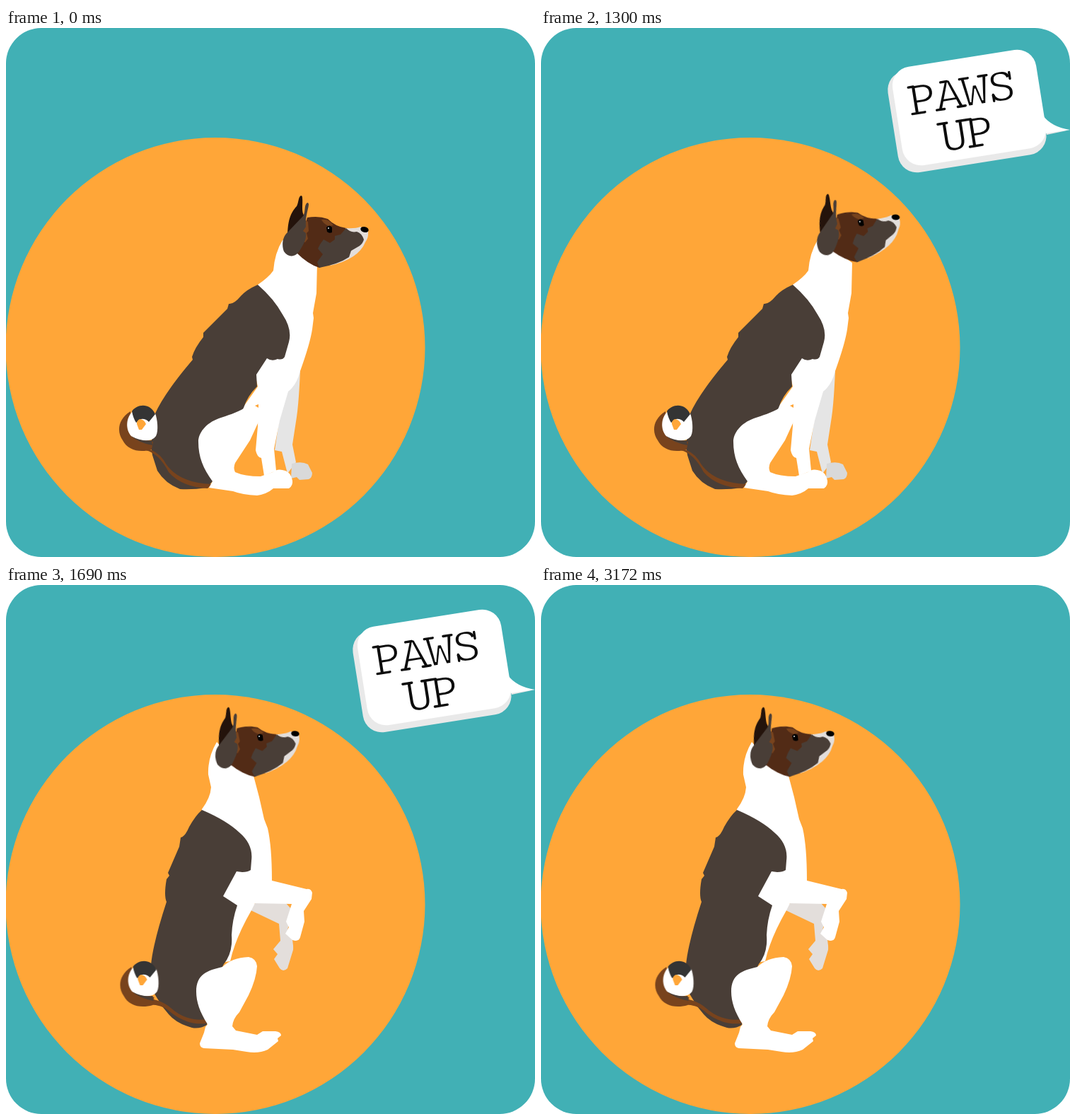
Animation of 748 by 748 pixels, one loop 3.64 s. Source, as an HTML page:

```html
<!DOCTYPE html>
<html lang="en">
<head>
<meta charset="utf-8">
<title>Paws up</title>
<style>
  html, body { margin: 0; width: 100%; height: 100%; overflow: hidden; background: #fff; }
  svg { display: block; width: 100%; height: 100%; }

  .dark { fill: #493e37; }
  .white { fill: #fff; }
  .far { fill: #e3dedb; }
  .tan { fill: #78431d; }
  .brown { fill: #522b16; }
  .orange { fill: #ffa638; }

  .pose, .head, .tail, .bubble { animation: 3640ms step-end infinite; }
  .sit { animation-name: sit; }
  .lift { animation-name: lift; }
  .rise { animation-name: rise; }
  .up { animation-name: up; }
  .head { animation-name: head; transform-origin: 402px 323px; }
  .tail { animation-name: tail; }
  .bubble { animation-name: bubble; }

  @keyframes sit { 0% { visibility: visible } 39.2857%, 100% { visibility: hidden } }
  @keyframes lift { 0%, 42.8571%, 100% { visibility: hidden } 39.2857% { visibility: visible } }
  @keyframes rise { 0%, 46.4286%, 100% { visibility: hidden } 42.8571% { visibility: visible } }
  @keyframes up { 0% { visibility: hidden } 46.4286%, 100% { visibility: visible } }
  @keyframes head {
    0% { transform: none }
    17.8571% { transform: translate(2px, -1px) rotate(-9.3deg) }
    39.2857% { transform: translate(-21px, -8px) rotate(-4.4deg) }
    42.8571% { transform: translate(-39px, -49.5px) rotate(-4.1deg) }
    46.4286%, 100% { transform: translate(-93px, -63px) rotate(-6.6deg) }
  }
  @keyframes tail {
    0% { transform: none }
    39.2857% { transform: translate(-3.5px, 5.5px) }
    42.8571% { transform: translate(4.5px, -4px) }
    46.4286%, 100% { transform: translate(1.5px, -2px) }
  }
  @keyframes bubble {
    0%, 67.8571%, 100% { visibility: hidden }
    17.8571% { visibility: visible; transform: none }
    42.8571% { visibility: visible; transform: translateY(4px) }
  }

  text {
    font: 62.4px "Liberation Mono", "Courier New", monospace;
    text-anchor: middle; fill: #0c0c0c; stroke: #fff; stroke-width: 1.7px;
  }
  .serifs { fill: none; stroke: #0c0c0c; stroke-width: 3.4; stroke-linecap: round; }
</style>
</head>
<body>
<svg viewBox="0 0 748 748">
  <rect width="748" height="748" rx="50" fill="#41b0b5"/>
  <circle class="orange" cx="296" cy="451.5" r="296.5"/>

  <g class="pose sit">
    <path fill="#e5e5e5" d="M416 485Q414 530 411 550L405 589 410 614 398 630 390 599 380 597 392 515Z"/>
    <path fill="#d9d9d9" d="M404 616Q418 612 427 617L433 629Q433 636 428 638L415 639 411 635 403 637Z"/>
    <path class="white" d="M391 300Q380 318 378 343 372 352 356 363L340 440 350 480 356 507 334 538 345 545 357 533 356 563 353 597Q355 607 361 608L365 633 382 626 379 595 387 555 399 514Q411 505 416 485 430 446 433 426L435 410 434 403 439 375 440 332 410 310Z"/>
    <path class="dark" d="M356 363Q379 383 391 405 405 426 400 444L394 465Q391 470 384 468 376 472 369 467L354 490 355 507Q342 519 336 537L300 600 292 641 284 650Q264 653 246 652 225 644 214 626L207 604 205 590 211 545Q224 516 264 469L263 465Q267 452 279 437L279 431 313 397 315 390Q322 391 332 379 340 370 356 363Z"/>
    <path class="tan" d="M197 594Q214 598 223 611 240 643 291 645L285 651Q248 649 230 628 216 601 197 597Z"/>
    <path class="white" d="M338 537C326 544 313 548 301 552 282 559 272 573 272 585 272 607 279 623 292 641L287 650 321 655Q334 660 355 661 369 659 378 651L400 651Q406 647 405 640 403 629 395 626 384 622 377 628L360 634Q337 634 324 628 321 622 324 615L345 583 357 557 357 532Z"/>
    <path class="orange" d="M352 534l5-2v5z"/>
  </g>

  <g class="pose lift">
    <path class="far" d="M407 470L404 545 402 575 409 602Q422 602 428 607L434 619 431 626 413 626 410 621 395 617 387 591Q377 587 377 578L375 535 371 505Z"/>
    <path class="white" d="M370 288Q356 309 357 334 350 346 336 356L320 440 346 495 325 540 334 540Q349 522 372 506L416 549 420 557 419 575 414 584 420 589 415 598Q419 605 424 609 432 615 436 609L442 587 439 571 446 548 404 486Q414 452 417 425L420 403 418 390 420 362 419 322 390 302Z"/>
    <path class="dark" d="M336 357Q361 377 377 399 388 414 387 433 386 448 382 457L373 459Q368 459 364 464L346 470 351 492 354 494Q334 515 328 541L300 600 292 641 284 650Q264 654 246 653 225 645 214 626L203 600 205 545Q217 512 253 471L252 466Q255 452 266 437L265 431 295 396 297 388Q303 388 311 377 322 364 336 357Z"/>
    <path class="tan" d="M197 600Q214 598 223 611 240 643 291 645L285 651Q248 649 230 628 218 604 197 602Z"/>
    <path class="white" d="M328 541Q341 534 351 535 358 536 359 545 354 565 343 585L324 615Q321 622 324 628L355 636 363 631 381 631Q389 632 389 637L384 641 385 645 370 657Q357 663 340 660L321 655 287 650 292 641C279 623 272 607 272 585 272 573 282 559 301 552Z"/>
  </g>

  <g class="pose rise">
    <path class="far" d="M365 475L393 484 410 532Q412 542 407 544L407 560Q416 568 417 585L414 603Q410 608 404 604L401 599 392 597 389 585 391 556 384 550 387 542Q372 513 356 492Z"/>
    <path class="white" d="M351 248Q337 270 337 305 333 318 320 332L310 430 349 466 322 546 331 530Q344 505 370 478L400 485 440 505 441 517 445 529 438 535 442 544 439 549Q444 557 450 561 459 565 461 558L465 537 465 515 470 502Q468 490 461 484L402 448Q407 410 408 375 408 365 404 356 404 330 400 300L401 281 372 262Z"/>
    <path class="dark" d="M320 333Q349 354 366 373 381 390 379 407 378 421 373 431 366 429 361 432 357 436 361 444L347 458 353 466Q336 488 332 515 330 533 322 548L295 585 287 630Q273 637 261 636 243 629 231 615L219 599 213 585 213 540Q222 504 249 454 246 444 254 420L259 416 257 413Q272 391 282 379L284 368Q291 367 300 352 309 338 320 333Z"/>
    <path class="tan" d="M190 585Q217 585 232 603 253 628 288 625L284 630Q252 632 232 613 217 591 196 594Z"/>
    <path class="white" d="M322 546Q338 537 353 537 362 538 361 548 354 572 340 596L321 619Q320 626 325 629L355 636 363 631 381 631Q389 632 389 637L384 641 385 645 370 657Q357 663 340 660L321 657 280 655Q274 654 274 648L280 633 287 630C273 609 274 594 275 582 277 565 295 557 310 552Z"/>
  </g>

  <g class="pose up">
    <path class="far" d="M342 458L355 448 395 449 405 460 398 488Q407 498 406 516L398 542Q392 548 387 542L379 529 384 522 378 515 388 503 386 479Z"/>
    <path class="white" d="M298 222Q285 244 286 268L290 286Q289 301 277 317L270 420 318 455 310 533 317 532Q324 500 347 460L352 450 404 451 396 476 400 484 395 493 405 502Q414 505 416 498L422 476 421 461 432 444 433 435Q431 429 425 430L376 418Q376 370 370 344L365 331 358 300 349 266 320 245Z"/>
    <path class="dark" d="M277 318Q312 333 330 350 350 367 347 390L346 403Q342 406 334 406L326 405 307 440 327 453Q320 473 319 495 321 520 308 536L290 570 284 622Q274 628 263 626 241 620 230 607L221 596 205 570 205 537Q208 506 227 448 223 439 227 416L231 411 229 407 245 370 247 357Q253 356 259 342 268 326 277 318Z"/>
    <path class="tan" d="M187 584Q216 583 233 598 255 618 285 614L283 620Q254 623 229 601 215 590 190 595Z"/>
    <path class="white" d="M306 540Q319 527 343 526 354 528 355 539 354 557 343 580L330 604Q321 613 320 624L325 630 355 636 363 631 381 631Q389 632 389 637L384 641 385 645 370 657Q357 663 340 660L321 657 280 655Q274 654 274 648L280 633 282 625 285 621C274 604 269 589 269 575 269 550 285 545 306 540Z"/>
  </g>

  <g class="tail">
    <path class="tan" d="M176 542C157 554 157 572 165 583 172 597 189 601 206 596L208 585 181 578Z"/>
    <path class="white" d="M179 542C169 552 169 568 177 577 186 584 205 587 212 577 216 569 214 553 211 545Z"/>
    <path fill="#343434" d="M178 542C185 532 203 529 211 546L202 557Q197 552 191 553L184 558Q180 552 178 542Z"/>
    <path class="orange" d="M185 560Q184 556 189 553 195 553 198 560L192 568H188Z"/>
    <path class="dark" d="M177 577Q191 585 206 583L207 590Q187 586 177 577Z"/>
  </g>

  <g class="head">
    <path fill="#24130b" d="M417 237C413 239 414 247 411 252 402 262 399 271 398 292L422 266C417 260 420 249 419 240Q419 237 417 237Z"/>
    <path class="brown" d="M426 268Q442 265 455 270 466 281 481 283L495 296 480 320 443 339Q427 334 411 318Z"/>
    <path class="tan" d="M446 271Q456 269 463 279L456 280Q449 277 446 271Z"/>
    <path class="far" d="M480 283Q494 284 501 281L512 288Q513 296 508 303 498 327 458 336L485 306Z"/>
    <path class="dark" d="M444 306L449 299 458 304 465 299 465 294 473 292 481 283Q487 290 496 288 503 290 506 299 505 304 500 308L488 315 485 324Q470 334 443 339L440 331 448 320 441 312Z"/>
    <path class="tan" d="M421 270L427 274 428 287 425 290 427 298 423 303 415 301Z"/>
    <path class="dark" d="M426 247C421 250 424 260 420 266L398 289C390 296 390 309 393 316 401 327 411 322 415 315 422 304 425 297 424 290L420 287 424 281C423 267 427 258 428 250Q428 247 426 247Z"/>
    <ellipse cx="507" cy="285" rx="5.8" ry="3.9" transform="rotate(14 507 285)"/>
    <path d="M453 282Q457 277 461 282V289Q457 291 454 288Z"/>
    <circle class="white" cx="456" cy="283" r=".9"/>
  </g>

  <g class="bubble">
    <path fill="#e8e8e8" d="M712 140Q728 147 748 144L715 151Z"/>
    <path class="white" d="M710 124Q722 140 748 144L714 149Z"/>
    <g transform="translate(602.5 117.5) rotate(-9)">
      <rect x="-106.5" y="-70" width="212" height="145" rx="27" fill="#e9e9e9"/>
      <rect class="white" x="-99" y="-75" width="205.5" height="141" rx="27"/>
      <text x="-3" y="-6.5">PAWS</text>
      <text x="-5" y="52">UP</text>
      <path class="serifs" d="M-77-8h18M-77-46h7M-42-8h11M-12-8h11M-31-46h9M-4-46h12M23-46h12M67-45v9M40-17v9M-44 12h13M-17 12h13M-4 50.500h18M-4 12h7"/>
    </g>
  </g>
</svg>
</body>
</html>
```
